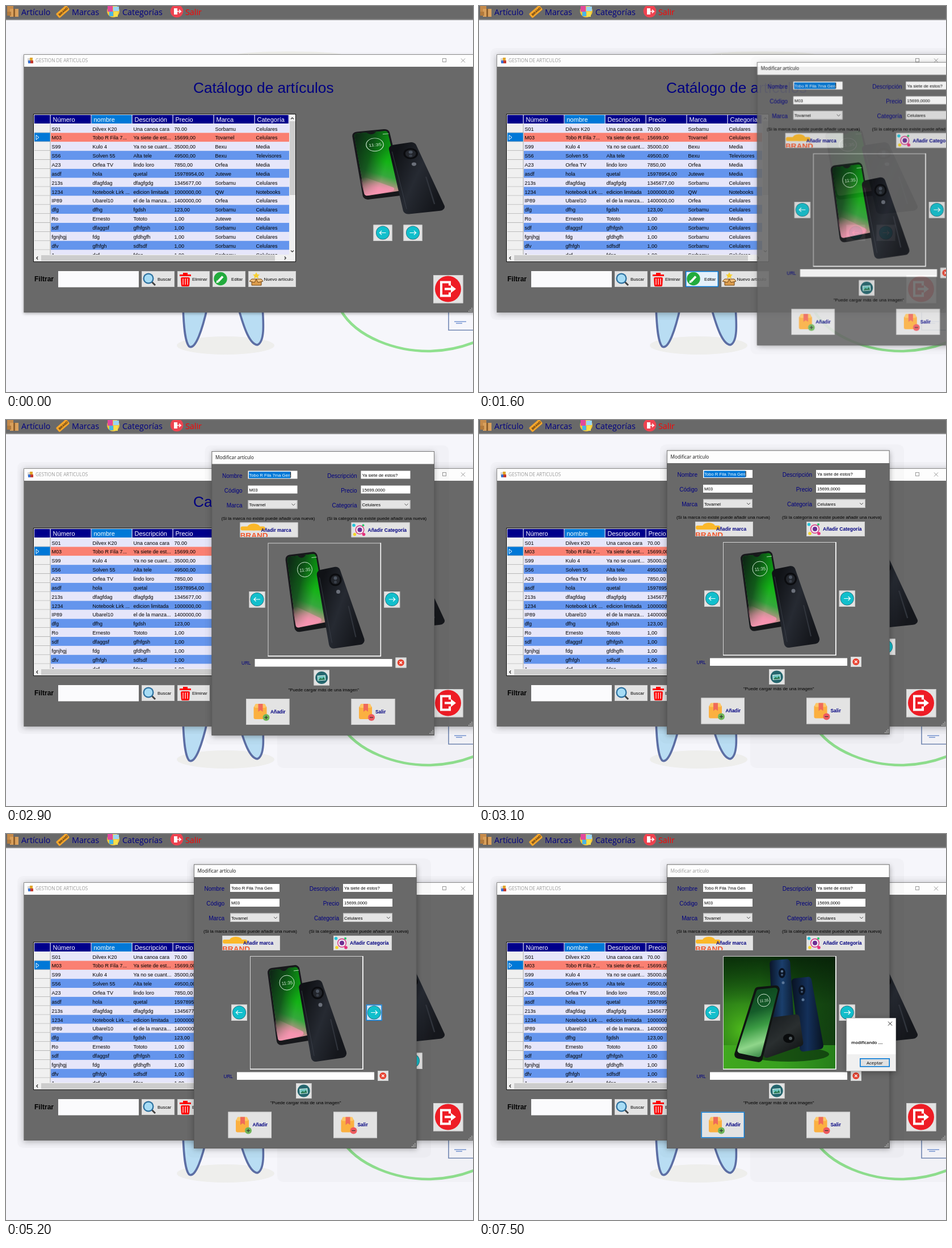
An HTML page with a canvas that plays this animation: 823 px wide and 680 px high, repeating every 8 s.

```html
<!DOCTYPE html>
<html lang="es">
<head>
<meta charset="utf-8">
<title>Catálogo de artículos</title>
<style>
html, body { margin: 0; width: 100%; height: 100%; overflow: hidden; background: #f6f6fb; }
canvas { display: block; }
</style>
</head>
<body>
<canvas id="stage" width="823" height="680"></canvas>
<script>
const W = 823, H = 680, LOOP = 8000;
const SANS = '"Liberation Sans", Arial, sans-serif';
const UI = '"Open Sans", "Noto Sans", sans-serif';
const NAVY = '#000080', BODY = '#696969', BLUE = '#0078d7', TEAL = '#12bfcc', RED = '#ee1c25';

const stage = document.getElementById('stage').getContext('2d');
const buffer = Object.assign(document.createElement('canvas'), { width: W, height: H });
const layer = buffer.getContext('2d');
let g = stage;
let blank = false; // controls not painted yet

// ---------- helpers ----------
function rect(x0, y0, x1, y1, fill) {
  g.fillStyle = fill;
  g.fillRect(x0, y0, x1 - x0, y1 - y0);
}
function frame(x0, y0, x1, y1, color, w = 1) {
  g.strokeStyle = color;
  g.lineWidth = w;
  g.strokeRect(x0 + w / 2, y0 + w / 2, x1 - x0 - w, y1 - y0 - w);
}
function round(x0, y0, x1, y1, r, fill) {
  g.fillStyle = fill;
  g.beginPath();
  g.roundRect(x0, y0, x1 - x0, y1 - y0, r);
  g.fill();
}
function oval(x, y, rx, ry, fill) {
  g.fillStyle = fill;
  g.beginPath();
  g.ellipse(x, y, rx, ry, 0, 0, 7);
  g.fill();
}
const disc = (x, y, r, fill) => oval(x, y, r, r, fill);
function line(color, w, ...pts) {
  g.strokeStyle = color;
  g.lineWidth = w;
  g.beginPath();
  pts.forEach(([x, y]) => g.lineTo(x, y));
  g.stroke();
}
function path(d, fill, stroke, w) {
  const p = new Path2D(d);
  if (fill) { g.fillStyle = fill; g.fill(p); }
  if (stroke) { g.strokeStyle = stroke; g.lineWidth = w; g.stroke(p); }
}
function poly(pts, r, fill) {
  const a = pts[pts.length - 1], b = pts[0];
  g.beginPath();
  g.moveTo((a[0] + b[0]) / 2, (a[1] + b[1]) / 2);
  pts.forEach((p, i) => g.arcTo(...p, ...pts[(i + 1) % pts.length], r));
  g.closePath();
  g.fillStyle = fill;
  g.fill();
}
function stops(grad, colors) {
  colors.forEach((c, i) => grad.addColorStop(i / (colors.length - 1), c));
  return grad;
}
const ramp = (x0, y0, x1, y1, ...colors) => stops(g.createLinearGradient(x0, y0, x1, y1), colors);
const glow = (x, y, r, ...colors) => stops(g.createRadialGradient(x, y, 0, x, y, r), colors);
function text(s, x, y, px, color, { font = SANS, weight = '', align = 'left' } = {}) {
  g.font = `${weight} ${px}px ${font}`;
  g.textAlign = align;
  const w = g.measureText(s).width;
  if (blank) {
    const left = align === 'right' ? x - w : x;
    rect(left, y - px, left + w, y + 3, '#fff');
  } else {
    g.fillStyle = color;
    g.fillText(s, x, y);
  }
}
const bold = { weight: 'bold' };
function at(x, y, sx, sy, draw) {
  g.save();
  g.translate(x, y);
  g.scale(sx, sy);
  draw();
  g.restore();
}
function fade(alpha, scale, cx, cy, draw) {
  layer.clearRect(0, 0, W, H);
  g = layer;
  draw();
  g = stage;
  g.globalAlpha = alpha;
  at(cx, cy, scale, scale, () => g.drawImage(buffer, -cx, -cy));
  g.globalAlpha = 1;
}
function panel(x0, y0, x1, y1, blur) {
  g.save();
  g.shadowColor = 'rgba(0,0,0,.3)';
  g.shadowBlur = blur;
  g.shadowOffsetY = 2;
  rect(x0, y0, x1, y1, BODY);
  g.restore();
}
const halo = (x0, y0, x1, y1) => round(x0, y0, x1, y1, 10, 'rgba(0,0,0,.02)');

// look: '', 'hover', 'press' or 'focus'
function button(x0, y0, x1, y1, look) {
  if (blank) return rect(x0, y0, x1, y1, '#fff');
  rect(x0, y0, x1, y1, { hover: '#e5f1fb', press: '#cce4f7' }[look] || '#e3e3e3');
  frame(x0, y0, x1, y1, look ? BLUE : '#cfcfcf', look ? 1.4 : 1);
}
function arrowButton(x, y, w, dir, look) {
  button(x - w / 2, y - 14, x + w / 2, y + 14.5, look);
  if (blank) return;
  disc(x, y, 12, '#1c5f6c');
  disc(x, y, 11.3, TEAL);
  at(x, y, dir, 1, () => line('#fff', 1.1, [-5.5, 0], [5.5, 0], [2, -3.5], [5.5, 0], [2, 3.5]));
}
function grip(x, y) {
  for (let i = 0; i < 3; i++)
    for (let j = 0; j <= i; j++) rect(x + i * 2.6, y - j * 2.6, x + i * 2.6 + 1.4, y - j * 2.6 + 1.4, '#d0d0d0');
}
function exitIcon(x, y, r) {
  disc(x, y, r, RED);
  at(x, y, r / 23, r / 23, () => {
    line('#fff', 4, [3, -6], [3, -12], [-12, -12], [-12, 12], [3, 12], [3, 6]);
    line('#fff', 4, [-6, 0], [6, 0]);
    path('M5-7 L14 0 L5 7Z', '#fff');
  });
}
function parcel(x, y, sign) {
  round(x, y + 4, x + 23, y + 27, 3, '#fbb040');
  poly([[x + 3, y], [x + 20, y], [x + 23, y + 7], [x, y + 7]], 2, '#fdc766');
  path(`M${x + 8} ${y}h8v14l-4-3l-4 3z`, '#ef6a5a');
  disc(x + 22, y + 24, 6, sign > 0 ? '#6fb65a' : '#ee5a5f');
  line('#333', 1.2, [x + 19, y + 24], [x + 25, y + 24]);
  if (sign > 0) line('#333', 1.2, [x + 22, y + 21], [x + 22, y + 27]);
}

// ---------- pictures ----------
function clock(x, y, r) {
  g.strokeStyle = '#cfe8d2';
  g.lineWidth = 1;
  g.beginPath();
  g.arc(x, y, r, 0, 7);
  g.stroke();
  at(x, y, 1, 1, () => {
    g.rotate(-.1);
    text('11:35', -r * .72, r * .25, r * .62, '#d8efda');
  });
}
function phones() {
  poly([[0, 6], [56, -1], [80, 132], [18, 142]], 8, '#17181b');
  const screen = [[4, 9], [54, 3], [75, 123], [20, 134]];
  poly(screen, 5, ramp(62, 40, 22, 140, '#0c9a12', '#14b416', '#35a83c', '#e58aa0', '#ffa0bd'));
  poly(screen, 5, ramp(4, 30, 58, 42, 'rgba(14,34,22,.95)', 'rgba(14,60,24,.75)', 'rgba(14,90,24,0)'));
  poly([[12, 95], [22, 97], [72, 121], [20, 134]], 4, ramp(20, 95, 30, 130, 'rgba(250,150,180,0)', 'rgba(250,150,180,.85)'));
  line('rgba(255,255,255,.7)', 1, [47, 10], [56, 9]);
  path('M22 6 q8 9 15-1z', '#17181b');
  clock(35, 31, 13);
  poly([[55, 33], [95, 25], [143, 162], [79, 171]], 8, ramp(55, 80, 140, 110, '#101216', '#262a32', '#15171c'));
  line('#3d424c', .8, [61, 45], [83, 160]);
  line('#31353d', 2, [112, 95], [125, 150]);
  disc(89, 49, 11, '#0b0c0f');
  disc(89, 49, 8, '#22252b');
  disc(89, 46, 3, '#4c5460');
  disc(89, 53, 2.5, '#3a404a');
  disc(94, 70, 3.5, '#6b707a');
}
function greenScene() {
  rect(431, 216, 628, 414, ramp(431, 216, 628, 216, '#1c6a14', '#1f7416', '#164f12', '#123f10'));
  rect(431, 216, 628, 414, glow(465, 345, 120, 'rgba(88,200,30,.85)', 'rgba(60,150,26,.45)', 'rgba(40,110,20,0)'));
  rect(431, 216, 628, 300, ramp(0, 216, 0, 300, 'rgba(4,26,6,.75)', 'rgba(4,26,6,0)'));
  rect(431, 372, 628, 414, ramp(431, 0, 628, 0, '#41a81f', '#38a01e', '#267f1a'));
  oval(545, 388, 72, 13, 'rgba(8,40,12,.65)');
  poly([[512, 223], [548, 220], [556, 345], [518, 350]], 6, ramp(512, 0, 556, 0, '#0a1428', '#1a3f6c', '#0c1a30'));
  poly([[550, 255], [585, 251], [608, 378], [566, 384]], 6, ramp(550, 0, 608, 0, '#081120', '#14305a', '#08121f'));
  for (const [x, y] of [[534, 245], [569, 275]]) {
    oval(x, y, 6, 9, '#0a1322');
    disc(x, y - 3, 2.3, '#55708f');
    disc(x, y + 3, 2, '#3b5372');
    disc(x + 2, y + 17, 2.5, '#5a7699');
  }
  poly([[508, 324], [564, 317], [572, 372], [500, 397]], 6, ramp(510, 320, 560, 390, '#171b1e', '#2a2f30', '#101314'));
  oval(546, 360, 10, 8, '#090b0c');
  disc(549, 360, 3, '#4f585c');
  poly([[487, 270], [532, 266], [498, 403], [448, 394]], 7, '#0f1411');
  poly([[490, 274], [528, 270], [496, 394], [454, 385]], 5, ramp(480, 285, 516, 390, '#0f4a20', '#155c2a', '#3c9c44', '#8fd68a', '#2d7d3c'));
  clock(502, 293, 11);
}

// ---------- desktop ----------
function desktop(t) {
  rect(0, 0, W, H, '#f6f6fb');
  oval(500, 88, 100, 8, '#eeeeea');
  oval(387, 598, 86, 16, '#eeeeec');
  const tooth = ['#b9ddf3', '#5c6ea4', 3.6];
  path('M312 530 C313 560 315 592 323 600 C334 606 346 570 355 530Z', ...tooth);
  path('M409 530 C420 570 430 596 443 597 C456 592 454 560 452 530Z', ...tooth);
  path('M590 536 C618 585 690 609 748 608 C782 607 806 600 826 592', null, '#90e08f', 4.6);
  line('#7187b3', 1.6, [780, 530], [780, 571], [826, 571]);
  line('#6d8fd0', 1.4, [790, 556], [811, 556]);
  line('#6d8fd0', 1.4, [793, 559], [804, 559]);

  rect(0, 0, W, 23, BODY);
  rect(0, 23, W, 25, '#8d8d8d');
  const menu = (s, x, color) => text(s, x, 15.5, 14.3, color, { font: UI });
  rect(2, 0, 13, 10, '#c58a4a');
  rect(7, 5, 22, 19, '#d9a05c');
  rect(2, 10, 9, 17, '#b37a3c');
  rect(13, 5, 16, 19, '#8f5f2c');
  menu('Artículo', 27, NAVY);
  at(100, 10, 1, 1, () => {
    g.rotate(-.72);
    round(-12, -5, 12, 5, 2, '#f6a62b');
    text('BRAND', -9, 2.2, 5.5, '#3a2410', bold);
  });
  menu('Marcas', 116, NAVY);
  disc(189, 9, 11, '#f3c63a');
  rect(179, 0, 188, 10, '#e2499b');
  rect(189, 1, 199, 9, '#9ad5f5');
  rect(182, 10, 189, 18, '#49b6e4');
  rect(190, 10, 197, 19, '#f7e04c');
  menu('Categorías', 205, NAVY);
  disc(301, 9, 11.3, '#ee4350');
  rect(296, 4, 302, 15, '#fff');
  line('#fff', 1.6, [300, 9.5], [308, 9.5], [305, 6.5], [308, 9.5], [305, 12.5]);
  menu('Salir', 316, '#ff0000');

  if (t >= 1300) halo(20, 74, 850, 553);
  if (t >= 2800) halo(478, 500, 850, 613);
}

// ---------- catalogue ----------
const HEADS = ['Número', 'nombre', 'Descripción', 'Precio', 'Marca', 'Categoría'];
const COLS = [79, 151, 223, 295, 367, 439, 499];
const ROWS = `S01|Dilvex K20|Una canoa cara|70.00|Sorbamu|Celulares
M03|Tobo R Fila 7...|Ya siete de est...|15699,00|Tovarnel|Celulares
S99|Kulo 4|Ya no se cuant...|35000,00|Bexu|Media
S56|Solven 55|Alta tele|49500,00|Bexu|Televisores
A23|Orfea TV|lindo loro|7850,00|Orfea|Media
asdf|hola|quetal|15978954,00|Jutewe|Media
213s|dfagfdag|dfagfgdg|1345677,00|Sorbamu|Celulares
1234|Notebook Lirk ...|edicion limitada|1000000,00|QW|Notebooks
IP89|Ubarel10|el de la manza...|1400000,00|Orfea|Celulares
dfg|dfhg|fgdsh|123,00|Sorbamu|Celulares
Ro|Ernesto|Tototo|1,00|Jutewe|Media
sdf|dfaggsf|gfhfgsh|1,00|Sorbamu|Celulares
fgnjhgj|fdg|gfdhgfh|1,00|Sorbamu|Celulares
dfv|gfhfgh|sdfsdf|1,00|Sorbamu|Celulares
1|dgf|fdsg|1,00|Sorbamu|Celulares`.split('\n').map(r => r.split('|'));

function grid() {
  rect(48, 190, 511, 451, '#111');
  rect(49, 191, 510, 450, '#f0f0f0');
  rect(50, 192, 499, 207, '#00008b');
  rect(151, 192, 222, 207, BLUE);
  COLS.forEach((x, i) => {
    rect(x - 1.5, 192, x - .3, 207, '#e8e8f4');
    if (i < 6) text(HEADS[i], x + 3.5, 204, 11, '#fff');
  });
  g.save();
  g.beginPath();
  g.rect(50, 207, 449, 231);
  g.clip();
  ROWS.forEach((row, i) => {
    const y = 207.6 + i * 15.86;
    rect(79, y, 499, y + 15.9, i === 1 ? '#fa8072' : i % 2 ? '#6495ed' : '#e6e6fa');
    rect(50, y, 78, y + 15.9, i === 1 ? BLUE : '#f0f0f0');
    rect(50, y + 15, 78, y + 15.8, '#a8a8a8');
    rect(77.5, y, 78.5, y + 15.9, '#a8a8a8');
    if (i === 1) path(`M53 ${y + 4}l5 4l-5 4z`, BLUE, '#fff', 1);
    row.forEach((s, c) => text(s, COLS[c] + 1.5, y + 12, 9, '#000'));
  });
  g.restore();
  rect(500, 203, 510, 333, '#cdcdcd');
  rect(62, 439, 474, 449, '#cdcdcd');
  const chevron = (x, y, dx, dy) =>
    line('#333', 1.3, [x - 2.5 * dy - 1.2 * dx, y - 2.5 * dx - 1.2 * dy], [x + 1.2 * dx, y + 1.2 * dy], [x + 2.5 * dy - 1.2 * dx, y + 2.5 * dx - 1.2 * dy]);
  chevron(504.5, 198, 0, -1);
  chevron(504.5, 432, 0, 1);
  chevron(55, 444, -1, 0);
  chevron(492, 444, 1, 0);
}

function catalogue(t) {
  const active = t >= 1300 && t < 1500;
  panel(31, 85, 850, 540, t < 1300 ? 5 : 10);
  rect(31, 85, W, 107, '#fdfdfd');
  line('#8a8a8a', 1, [W, 85.5], [31.5, 85.5], [31.5, 540]);
  rect(38, 92, 45, 99, '#d8d8d8');
  rect(42, 91, 47, 96, '#e0a52c');
  rect(39, 96, 43, 101, '#3a6fd0');
  rect(43, 96, 48, 101, '#c5392e');
  const ink = active ? '#111' : '#999';
  text('GESTION DE ARTICULOS', 52, 99.3, 8.2, ink, { font: UI });
  frame(769, 92, 776, 99, ink);
  line(ink, 1, [802, 92.5], [809, 99.5]);
  line(ink, 1, [809, 92.5], [802, 99.5]);
  if (active) line('#ccc', 1, [737, 96.5], [744, 96.5]);

  text('Catálogo de artículos', 330, 152.5, 26.2, NAVY);
  grid();
  text('Filtrar', 50, 485, 12, '#000', bold);
  rect(92, 467, 234, 495.5, '#fbfbfd');

  const edit = t < 1000 ? '' : t < 1700 ? 'hover' : 'focus';
  button(239, 467, 297, 495);
  line('#444', 3, [256, 485], [263, 492]);
  disc(251, 480, 9.5, '#2b6f9e');
  disc(251, 480, 7.3, '#a6dcf5');
  text('Buscar', 267, 484, 7.8, '#000');

  button(302, 467, 359, 495);
  rect(306, 473, 326, 476, '#f00');
  rect(312, 470, 320, 473, '#f00');
  poly([[308, 478], [324, 478], [323, 494], [309, 494]], 2, '#f00');
  for (const x of [312, 316, 320]) line('#fff', 1.2, [x, 480], [x, 491]);
  text('Eliminar', 328, 484, 7.4, '#000');

  button(364, 467, 422, 495, edit);
  disc(378, 480.5, 11.7, '#22ab3d');
  line('#fff', 4, [374, 485], [382, 476.5]);
  path('M370.5 488l1-5l4 4z', '#fff');
  text('Editar', 397, 484, 7.7, '#000');

  button(427, 467, 511, 495);
  rect(433, 481, 450, 492, '#dc9c4c');
  path('M433 481l-4 4l9 2l3-6l3 6l9-2l-3-4z', '#f2c07c', '#704515', 1);
  path('M441 469l2 4h4l-3 3l1 4l-4-2l-4 2l1-4l-3-3h4z', '#f7d030');
  line('#704515', 1, [433, 485], [433, 492], [450, 492], [450, 485]);
  text('Nuevo artículo', 454.5, 484, 8, '#000');

  at(609, 217, 1.17, .88, phones);
  arrowButton(664, 399.5, 33, -1);
  arrowButton(717, 399.5, 33, 1);
  button(753, 474, 805.5, 523.5);
  exitIcon(779, 498.5, 23);
  grip(815, 537);
}

// ---------- edit dialog ----------
function field(x0, y0, s, combo) {
  rect(x0, y0, x0 + 87, y0 + (combo ? 15.5 : 14), combo ? '#e4e4e4' : '#fff');
  if (combo && !blank) {
    frame(x0, y0, x0 + 87, y0 + 15.5, '#b5b5b5');
    line('#555', 1, [x0 + 77, y0 + 6.5], [x0 + 80, y0 + 9.5], [x0 + 83, y0 + 6.5]);
  }
  if (!blank) text(s, x0 + 2, y0 + (combo ? 11 : 10), 7.7, '#000');
}
function nameField(t) {
  const name = 'Tobo R Fila 7ma Gen';
  field(395, 88, name);
  if (blank || t >= 5200) return;
  g.font = `7.7px ${SANS}`;
  const end = 397 + g.measureText(name).width;
  rect(396.5, 89.5, end, 101, BLUE);
  text(name, 397, 98, 7.7, '#fff');
  const since = t < 2900 ? t - 1500 : t - 2900;
  if (Math.floor(since / 500) % 2 === 0) rect(end, 90, end + 1, 100, '#000');
}
const step = (t, ...keys) => keys.filter(k => k[0] <= t).pop();
const nextLook = t => step(t, [0, ''], [4900, 'hover'], [5200, 'press'], [5400, 'hover'], [5800, 'press'],
  [5900, 'hover'], [6300, 'press'], [6400, 'hover'], [6800, 'focus'], [7000, ''])[1];
const addLook = t => step(t, [0, ''], [4300, 'hover'], [4600, ''], [6900, 'hover'], [7000, 'press'], [7200, 'focus'])[1];
const showsScene = t => (t >= 5400 && t < 6000) || t >= 6500;

function dialog(t) {
  halo(319, 43, 749, 570);
  panel(331, 53.5, 723.5, 554, 9);
  rect(331, 53.5, 723.5, 76, '#fdfdfd');
  frame(331, 53.5, 723.5, 554, '#5a5a5a', .8);
  text('Modificar artículo', 337.5, 67.5, 8.3, t < 7200 ? '#111' : '#999', { font: UI });

  const label = (s, x, y) => text(s, x, y, 10, NAVY, { align: 'right' });
  [['Nombre', 'Descripción'], ['Código', 'Precio'], ['Marca', 'Categoría']].forEach(([a, b], i) => {
    label(a, 385, 100.3 + i * 26);
    label(b, 587, 100.3 + i * 26);
  });
  nameField(t);
  field(395, 114, 'M03');
  field(395, 139.5, 'Tovarnel', true);
  field(594, 88, 'Ya siete de estos?');
  field(594, 114, '15699,0000');
  field(594, 139.5, 'Celulares', true);
  text('(Si la marca no existe puede añadir una nueva)', 348, 174, 7.85, '#000');
  text('(Si la categoría no existe puede añadir una nueva)', 534, 174, 7.85, '#000');

  button(381, 179, 483, 205);
  button(577, 179, 680, 205);
  if (!blank) {
    oval(405, 187, 11, 6, '#fbb829');
    round(382, 186, 425, 193, 3, '#fbb829');
    g.save();
    g.beginPath();
    g.rect(382, 195, 60, 9.5);
    g.clip();
    text('BRAND', 381, 206.5, 13.6, '#f1562c', bold);
    g.restore();
    text('Añadir marca', 418, 195, 8.3, NAVY, bold);
    disc(592, 192, 8, '#d6307f');
    disc(592, 192, 6.6, '#f3e9f2');
    disc(592, 192, 4, '#6b2f92');
    disc(581.5, 184, 2.8, '#24c6dc');
    disc(583, 200, 2.8, '#f6d42a');
    disc(599, 200, 2.8, '#e62f7c');
    disc(598, 184, 2, '#29c36a');
    text('Añadir Categoría', 606, 195, 8.5, NAVY, bold);
  }

  if (blank) rect(430, 215, 629, 415, '#fff');
  else {
    if (showsScene(t)) greenScene();
    else at(460, 231, 1, 1, phones);
    frame(430, 215, 629.5, 415, '#d4d4d4');
    line('#fff', 1.6, [628.8, 215], [628.8, 414.3], [430, 414.3]);
  }
  arrowButton(411, 314.5, 28, -1);
  arrowButton(648.7, 314.5, 28, 1, nextLook(t));

  text('URL', 383.5, 429.7, 8.2, NAVY);
  rect(407, 419.5, 649, 433, '#fff');
  button(655, 417, 674, 435);
  button(511, 439, 538.5, 466);
  if (!blank) {
    disc(664.3, 426, 6, '#e8412f');
    line('#fff', 1.3, [662, 423.7], [666.6, 428.3]);
    line('#fff', 1.3, [666.6, 423.7], [662, 428.3]);
    disc(524.7, 452.5, 11, '#25666e');
    at(524.5, 452.5, 1, 1, () => {
      g.rotate(-.08);
      rect(-7, -4, 7, 5, '#e8f6f4');
      rect(-6, -3, 6, 4, '#6cc6c0');
      path('M-6 4l4-4l3 2l3-3l2 5z', '#27764f');
    });
  }
  text('"Puede cargar más de una imagen"', 466, 476, 7.9, '#000');

  button(391.5, 489.5, 468, 535.5, addLook(t));
  button(577, 489.5, 654, 535.5);
  if (!blank) {
    parcel(405, 498.5, 1);
    text('Añadir', 434.5, 515, 8.4, NAVY, bold);
    parcel(590.5, 498.5, -1);
    text('Salir', 619.5, 515, 8.4, NAVY, bold);
  }
  grip(715, 550);
}

function message() {
  panel(647.5, 324, 735, 418, 10);
  rect(647.5, 324, 735, 418, '#fff');
  rect(647.5, 388, 735, 418, '#f0f0f0');
  frame(647.5, 324, 735, 418, '#9a9a9a', .6);
  line('#222', 1, [721, 330.5], [728, 337.5]);
  line('#222', 1, [728, 330.5], [721, 337.5]);
  text('modificando ....', 656, 369.7, 7.5, '#000', { font: UI, weight: '600' });
  rect(671, 395, 724, 410.5, '#e1e1e1');
  frame(671, 395, 724, 410.5, BLUE, 1.6);
  text('Aceptar', 683, 405.7, 8, '#000', { font: UI });
}

// ---------- timeline ----------
function draw(t) {
  desktop(t);
  catalogue(t);
  if (t >= 1300) {
    const [, dx, dy] = step(t, [0, 158.5, 44.5], [2800, 105, 22], [2900, 31.5, 1.5], [3000, 9, -1.5], [3100, 0, 0]);
    const paint = () => at(dx, dy, 1, 1, () => dialog(t));
    if (t < 1700) {
      const [, alpha, scale] = step(t, [1300, .05, .95], [1400, .15, .96], [1500, .6, .985], [1600, .9, .997]);
      blank = t < 1500;
      fade(alpha, scale, 685.5, 348, paint);
      blank = false;
    } else paint();
  }
  if (t >= 7200) {
    const [, alpha, scale] = step(t, [7200, .15, .94], [7300, .7, .98], [7400, .95, 1], [7500, 1, 1]);
    fade(alpha, scale, 691, 371, message);
  }
}
function tick() {
  draw(performance.now() % LOOP);
  requestAnimationFrame(tick);
}
tick();
</script>
</body>
</html>
```
